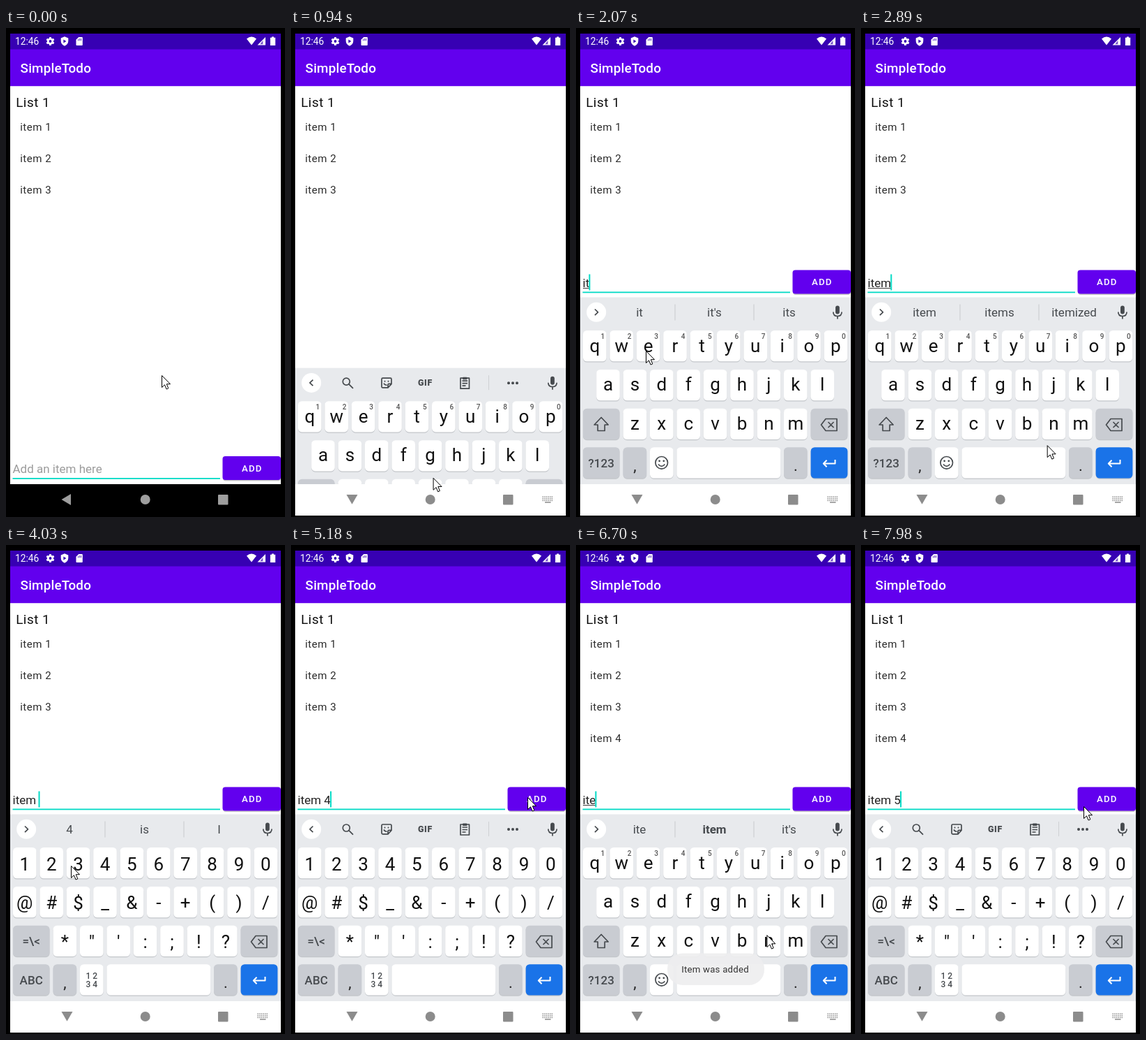
An HTML page for the animation above (8000 ms loop, 400 by 700 pixels).

```html
<!DOCTYPE html>
<html lang="en">
<head>
<meta charset="utf-8">
<title>SimpleTodo</title>
<style>
html, body { margin: 0; width: 100%; height: 100%; overflow: hidden; background: #000; }
svg { display: block; width: 400px; height: 700px; font-family: Roboto, sans-serif; }
text { white-space: pre; }
.mid { text-anchor: middle; }
.ico { fill: none; stroke: #464a4e; stroke-width: 1.7; stroke-linejoin: round; }
</style>
</head>
<body>
<svg id="stage" viewBox="0 0 400 700" xmlns="http://www.w3.org/2000/svg"></svg>
<script>
const LOOP = 8000, FOCUS = 800, SLIDE = 860, ADDED = 5330;
const DARK = '#464a4e';

// time, text in the field, suggestions
const edits = [
  [FOCUS, '', null],
  [1480, 'i', ['i', 'I', "I'm"]],
  [1850, 'it', ['it', "it's", 'its']],
  [2150, 'ite', ['ite', '*item', "it's"]],
  [2560, 'item', ['item', 'items', 'itemized']],
  [3030, 'item ', ['4', 'is', 'I']],
  [4720, 'item 4', null],
  [ADDED, '', null],
  [5960, 'i', ['i', 'I', "I'm"]],
  [6180, 'it', ['it', "it's", 'its']],
  [6430, 'ite', ['ite', '*item', "it's"]],
  [6950, 'item', ['item', 'items', 'itemized']],
  [7150, 'item ', ['4', 'is', 'I']],
  [7780, 'item 5', null]
];

// time, x, y of the pointer tip
const path = [
  [0, 223, 497], [310, 223, 497], [680, 200, 630], [830, 200, 632], [1090, 215, 660],
  [1290, 247, 469], [1410, 288, 460], [1500, 288, 460], [1770, 178, 461], [1870, 178, 461],
  [2070, 100, 462], [2170, 100, 462], [2500, 310, 570], [2770, 310, 573], [2890, 267, 597],
  [2980, 240, 610], [3040, 240, 610], [3290, 32, 618], [3370, 32, 618], [3620, 144, 464],
  [3820, 93, 459], [4390, 93, 459], [4620, 138, 461], [4740, 138, 461], [5160, 339, 361],
  [5400, 339, 361], [5820, 290, 456], [5970, 290, 456], [6130, 177, 460], [6200, 177, 460],
  [6380, 98, 461], [6450, 98, 461], [6700, 273, 558], [6820, 304, 566], [6970, 306, 568],
  [7110, 245, 605], [7170, 245, 605], [7390, 32, 616], [7460, 32, 616], [7700, 176, 476],
  [7800, 176, 474], [7980, 319, 374], [8000, 319, 374]
];

const rect = (x, y, w, h, fill, r = 0, more = '') =>
  `<rect x="${x}" y="${y}" width="${w}" height="${h}" rx="${r}" fill="${fill}" ${more}/>`;
const text = (x, y, size, fill, str, more = '') =>
  `<text x="${x}" y="${y}" font-size="${size}" fill="${fill}" ${more}>${str.replace(/&/g, '&amp;').replace(/</g, '&lt;')}</text>`;
const mid = (x, y, size, fill, str, more = '') => text(x, y, size, fill, str, 'class="mid" ' + more);
const shape = (d, more = '') => `<path d="${d}" ${more}/>`;
const icon = (d, more = '') => shape(d, 'class="ico" ' + more);
const dot = (x, y, r, fill) => `<circle cx="${x}" cy="${y}" r="${r}" fill="${fill}"/>`;
const group = (id, body, more = '') => `<g id="${id}" ${more}>${body}</g>`;

const PITCH = 38.4, KEY = 33.6;
const key = (x, y, w = KEY, fill = '#fff') =>
  rect(x, y + 1, w, 44.5, '#c3c6ca', 5.5) + rect(x, y, w, 44.3, fill, 5.5);
const keyRow = (x, y, n) => Array.from({ length: n }, (_, i) => key(x + i * PITCH, y)).join('');
const labels = (chars, x, y) =>
  [...chars].map((c, i) => mid(x + KEY / 2 + i * PITCH, y, 26, '#111', c)).join('');

function statusBar() {
  const teeth = Array.from({ length: 6 }, (_, i) =>
    rect(62, 13, 3, 3, '#fff', .6, `transform="rotate(${i * 60} 63.5 19)"`)).join('');
  return rect(6, 8, 388, 22.5, '#3700b3') + text(13, 24.3, 13.8, '#fff', '12:46') +
    teeth + dot(63.5, 19, 4.6, '#fff') + dot(63.5, 19, 1.9, '#3700b3') +
    shape('M84 12.2l5.3 2.3v4c0 3.4-2.2 6-5.3 7.2-3.100-1.200-5.300-3.800-5.300-7.200v-4z', 'fill="#fff"') +
    shape('M82.4 16.500l4 2.500-4 2.500z', 'fill="#3700b3"') +
    shape('M104.200 13h4.600q1 0 1 1v10q0 1-1 1h-7.300q-1 0-1-1v-7.300z', 'fill="#fff"') +
    shape('M103.500 16v2.300M105.500 15v3.300M107.500 15v3.300', 'stroke="#3700b3" stroke-width=".8"') +
    shape('M345 15.500q7-5.800 14 0l-7 9z', 'fill="#fff"') +
    shape('M372 13v11.500h-11.500z', 'fill="#fff"') +
    shape('M368.300 18v5.300h-4z', 'fill="#3700b3" opacity=".7"') +
    shape('M381 12.500h3v1.300h2.200v11.200h-7.300v-11.200h2.100z', 'fill="#fff"');
}

function navBar() {
  const c = '#8c8c8c';
  const cells = Array.from({ length: 18 }, (_, i) =>
    rect(360.5 + i % 6 * 2.6, 670.5 + (i / 6 | 0) * 2.6, 1.5, 1.5, c)).join('');
  return group('navDark', shape('M79.500 675l13.500-8v16z', 'fill="#9e9e9e"') +
      dot(199.7, 675, 7, '#9e9e9e') + rect(304, 668, 14.5, 14.500, '#9e9e9e', 1)) +
    group('navLight', rect(6, 653, 388, 45, '#fff') +
      shape('M79.500 668h16l-8 13.700z', `fill="${c}"`) + dot(199.7, 675, 7, c) +
      rect(304, 668, 14.5, 14.5, c, 1) + cells + rect(364, 678.3, 8.500, 1.5, c));
}

function inputBar() {
  return rect(311, 614, 83, 34.6, '#000', 4, 'opacity=".22"') +
    rect(310.5, 613, 83.5, 34, '#6200ee', 4) +
    group('ripple', rect(310.5, 613, 83.5, 34, '#fff', 4)) +
    text(338, 634.8, 13.2, '#fff', 'ADD', 'font-weight="500" letter-spacing="1.18"') +
    rect(9.5, 644, 297.5, 1.8, '#03dac5') +
    text(9.5, 637.3, 17, '#9c9c9c', 'Add an item here', 'id="hint"') +
    text(9.5, 637.3, 17, '#222', '', 'id="field"') +
    rect(10, 638.6, 0, 1, '#333', 0, 'id="under"') +
    rect(9, 619, 2, 23, '#03dac5', 0, 'id="caret"');
}

function toolbar() {
  return icon('M31.500 402.500l-4.500 4.300 4.500 4.300') +
    '<circle class="ico" cx="79.300" cy="405" r="5"/>' + icon('M83 408.700l6 6', 'stroke-width="2.200"') +
    icon('M131.500 400h11q1.500 0 1.500 1.500v7l-5 5.300h-7.500q-1.500 0-1.500-1.500v-10.800q0-1.500 1.500-1.500zM144 408.300h-3.500q-1.500 0-1.500 1.500v4M133 407.500q1.500 3 4.500 2.500') +
    dot(134.5, 404.500, 1, DARK) + dot(139.5, 404.500, 1, DARK) +
    mid(192.5, 411.2, 12.4, DARK, 'GIF', 'font-weight="900" letter-spacing=".7"') +
    icon('M243 400h12.500v15h-12.500zM245.500 404h7.500M245.500 407.500h7.500M245.500 411h5') +
    rect(246, 398.5, 6.500, 3.6, DARK, 1) +
    rect(283, 396, 1, 21, '#cfd1d4') +
    [312, 318, 324].map(x => dot(x, 407, 2, DARK)).join('');
}

function suggestions() {
  return icon('M27 402.500l4.500 4.300-4.500 4.300') +
    rect(141.5, 395.5, 1, 23, '#c8cacd') + rect(254.5, 395.5, 1, 23, '#c8cacd') +
    [91, 198.5, 305.500].map((x, i) => mid(x, 413.2, 17, DARK, '', `id="word${i}"`)).join('');
}

function keyboard() {
  const gray = '#c9ccd2', xs = 10, x2 = 29.2, x3 = 67.6;
  const digits = [...'1234567890'].map((d, i) =>
    mid(38.3 + i * PITCH, 444.8, 10, '#555', d, 'font-weight="500"')).join('');
  const fn = (y, s) => mid(36.2, y, 17, DARK, s, 'font-weight="500"');
  const letters = labels('qwertyuiop', xs, 464) + digits + keyRow(x2, 489, 9) +
    labels('asdfghjkl', x2, 519.3) + labels('zxcvbnm', x3, 574.600) +
    icon('M36.200 557.500l10 10.500h-5v8.500h-10v-8.500h-5z', 'stroke-width="2"') +
    fn(628.5, '?123') + '<circle class="ico" cx="122.700" cy="622.300" r="8.800"/>' +
    dot(119.600, 619.800, 1.400, DARK) + dot(125.8, 619.800, 1.400, DARK) +
    icon('M118 624.500q4.700 5.800 9.400 0');
  const symbols = labels('1234567890', xs, 466) + keyRow(xs, 489, 10) +
    labels('@#$_&-+()/', xs, 521) + labels('*"\':;!?', x3, 576.500) +
    fn(573, '=\\<') + fn(628.5, 'ABC') +
    mid(122.8, 620.500, 12, DARK, '1 2', 'font-weight="500"') +
    mid(122.8, 633.300, 12, DARK, '3 4', 'font-weight="500"');
  return rect(6, 385.5, 388, 268, '#e8eaed') + dot(29.2, 406.8, 14, '#fff') +
    group('tools', toolbar()) + group('words', suggestions()) +
    rect(372, 397.500, 5.8, 12, DARK, 2.9) +
    icon('M368.800 406.500q0 6 6.100 6t6.100-6M374.900 412.500v4') +
    keyRow(xs, 433, 10) + keyRow(x3, 544.7, 7) +
    key(10, 544.7, 52.5, gray) + key(336.6, 544.7, 52.800, gray) +
    key(10, 600.2, 52.5, gray) + key(67.6, 600.2, KEY, gray) + key(106, 600.2) +
    key(144.4, 600.2, 149) + key(298, 600.2, KEY, gray) + key(336.6, 600.2, 52.800, '#1a73e8') +
    icon('M358 559.500h16v17h-16l-6.500-8.500zM361.500 564l8 8M369.500 564l-8 8', 'stroke-width="1.900"') +
    icon('M371.500 618v5.500h-16.500M359.500 618.800l-4.700 4.700 4.700 4.700', 'style="stroke:#fff;stroke-width:2"') +
    mid(84.4, 634, 22, '#222', ',') + mid(314.8, 634, 22, '#222', '.') +
    group('letters', letters) + group('symbols', symbols);
}

const item = n => text(20.2, 146.5 + (n - 1) * 45.2, 15.1, '#2b2b2b', 'item ' + n,
  `letter-spacing=".47" id="item${n}"`);

const stage = document.getElementById('stage');
stage.innerHTML =
  '<clipPath id="body"><rect x="6" y="83" width="388" height="570.500"/></clipPath>' +
  rect(0, 0, 400, 700, '#000') + rect(6, 83, 388, 570, '#fff') + rect(6, 30, 388, 53.2, '#6200ee') +
  statusBar() + text(20.6, 64, 18.9, '#fff', 'SimpleTodo', 'font-weight="500" letter-spacing=".14"') +
  text(14.2, 112.500, 18.9, '#111', 'List 1', 'letter-spacing=".5"') + [1, 2, 3, 4].map(item).join('') +
  `<g clip-path="url(#body)">${group('input', inputBar())}${group('board', keyboard())}</g>` + navBar() +
  group('toast', rect(131, 584.5, 139, 45.500, '#eeeeef', 22, 'opacity=".93"') +
    mid(199.5, 612, 13.2, '#333', 'Item was added', 'letter-spacing=".24"')) +
  group('pointer', shape('M0 0V17L4 13.300 6.600 19.500 9.300 18.300 6.800 12.200H12z',
    'fill="#fff" stroke="#000" stroke-width="1" stroke-linejoin="round"'));

const ui = {};
stage.querySelectorAll('[id]').forEach(e => ui[e.id] = e);

const show = (e, on) => e.setAttribute('visibility', on ? 'inherit' : 'hidden');
const move = (e, x, y) => e.setAttribute('transform', `translate(${x} ${y})`);
const ramp = (t, a, b) => Math.min(1, Math.max(0, (t - a) / (b - a)));
const within = (t, a, b) => t >= a && t < b;

// Monotone cubic through the path points
function slope(i, k) {
  if (i <= 0 || i >= path.length - 1) return 0;
  const rate = j => (path[j + 1][k] - path[j][k]) / (path[j + 1][0] - path[j][0]);
  const a = rate(i - 1), b = rate(i);
  return a * b <= 0 ? 0 : 2 * a * b / (a + b);
}
function along(t, k) {
  let i = 0;
  while (i < path.length - 2 && path[i + 1][0] <= t) i++;
  const p = path[i], q = path[i + 1], d = q[0] - p[0], u = (t - p[0]) / d;
  const v = u * u * (3 - 2 * u);
  return p[k] + (q[k] - p[k]) * v +
    d * u * (1 - u) * ((1 - u) * slope(i, k) - u * slope(i + 1, k));
}

function draw(t) {
  const [since, value, words] = edits.filter(e => e[0] <= t).pop() || [0, '', null];
  const open = t >= SLIDE;

  ui.field.textContent = value;
  const width = value ? ui.field.getComputedTextLength() : 0;
  show(ui.hint, !value);
  ui.under.setAttribute('width', value.includes(' ') ? 0 : width);
  ui.caret.setAttribute('x', 9.3 + Math.max(0, width - .6));
  show(ui.caret, t >= FOCUS && (t - since) % 1000 < 500);

  show(ui.tools, !words);
  show(ui.words, words);
  if (words) words.forEach((w, i) => {
    const e = ui['word' + i], bold = w[0] === '*';
    e.textContent = bold ? w.slice(1) : w;
    e.setAttribute('font-weight', bold ? 700 : 400);
  });

  const sym = within(t, 3350, ADDED + 70) || t >= 7440;
  show(ui.symbols, sym);
  show(ui.letters, !sym);

  const rise = 1 - ramp(t, SLIDE, 1070);
  show(ui.board, open);
  move(ui.board, 0, 268 * rise * rise);
  move(ui.input, 0, t >= 960 ? -266.5 : 0);
  show(ui.navLight, open);
  show(ui.navDark, !open);

  show(ui.item4, t >= ADDED);
  ui.ripple.setAttribute('opacity', .24 * ramp(t, 5240, 5320) * (1 - ramp(t, 5360, 5560)));
  ui.toast.setAttribute('opacity', ramp(t, 5420, 5600) * (1 - ramp(t, 7380, 7540)));
  move(ui.pointer, along(t, 1) + .5, along(t, 2) + .5);
}

const start = performance.now();
function tick() {
  draw((performance.now() - start) % LOOP);
  requestAnimationFrame(tick);
}
draw(0);
requestAnimationFrame(tick);
</script>
</body>
</html>
```
